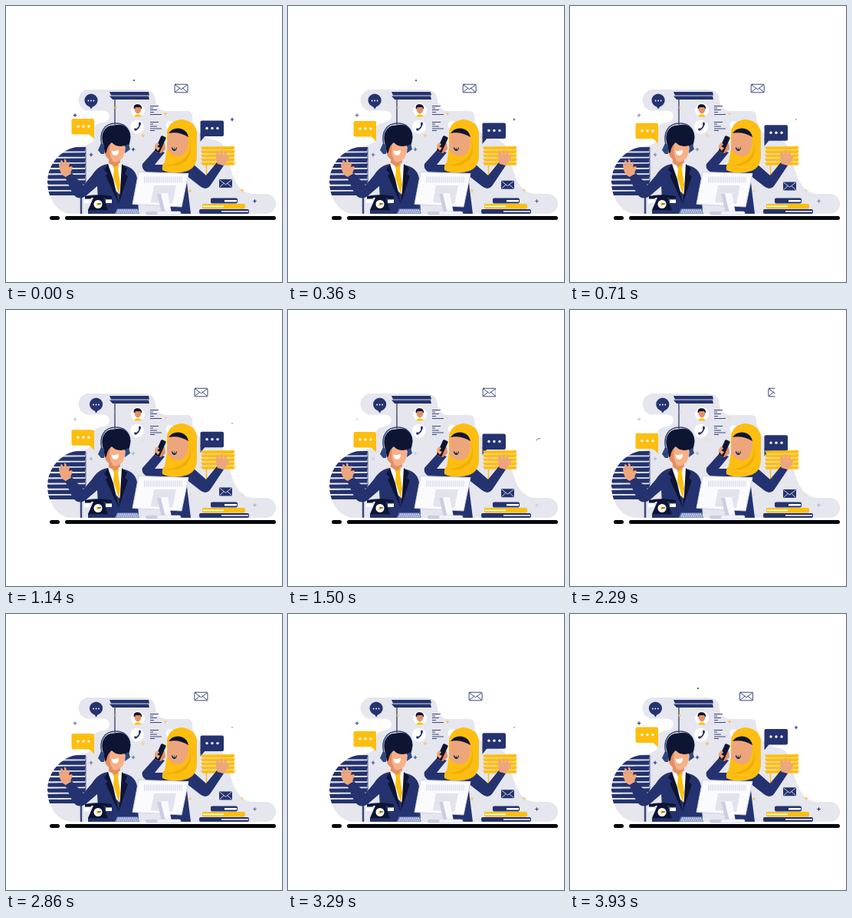
An HTML page that plays this animation: 360 by 360 pixels, repeating every 4 s.

```html
<!DOCTYPE html>
<html lang="en">
<head>
<meta charset="utf-8">
<title>Support desk</title>
<style>
html, body { margin: 0; width: 100%; height: 100%; overflow: hidden; background: #fff }
svg { display: block; width: 100vw; height: 100vh }
.blue { fill: #24336f } .navy { fill: #0e1533 } .gold { fill: #fdbe10 } .fold { fill: #f0ad0c }
.pale { fill: #fff } .skin { fill: #f8b087 } .tan { fill: #eda67c } .shade { fill: #e58e62 }
.line { fill: none; stroke-linecap: round; stroke-linejoin: round }
</style>
</head>
<body>
<svg viewBox="0 0 360 360">
  <defs>
    <path id="blob" d="M106 109H179Q194 109 195 123Q196 137 211 137H236Q243 137 243 144Q243 151 245 153C250 169 262 173 274 175C287 180 288 193 291 205C297 228 304 244 323 245H339A13 13 0 0 1 339 271H84C65 269 54 249 54 229C55 205 72 188 91 184C102 182 111 181 115 174V158C118 152 125 153 130 151Q135 148 135 143Q134 137 126 136.500H106A14 14 0 0 1 106 109Z"/>
    <clipPath id="inBlob"><use href="#blob"/></clipPath>
    <clipPath id="mailEdge"><rect id="mailClip" width="271" height="360"/></clipPath>
  </defs>

  <use href="#blob" fill="#e5e6ee"/>
  <g id="leftBlind" class="blue" clip-path="url(#inBlob)"></g>
  <path class="line" d="M104 185V248" stroke="#24336f" stroke-width=".8"/>
  <path class="line" d="M98 246V270" stroke="#3c487b" stroke-width="2.500"/>
  <path class="blue" d="M135 112H186L187 116.500H137ZM135 117.500H186L187 122H139Z"/>
  <path d="M142 122V155" stroke="#46527f" stroke-width="1.500"/>

  <!-- contact list -->
  <g class="pale"><circle cx="172" cy="136" r="9"/><circle cx="171" cy="157.500" r="9"/><circle cx="214" cy="155.500" r="5.500"/></g>
  <path class="gold" d="M167 143.500Q172 139 177 143.500Q172 146 167 143.500Z"/>
  <path class="shade" d="M168 132H176V137Q172 144 168 137Z"/>
  <path class="navy" d="M167 135Q165 129 171 128Q178 128 177 135L175 132H169Z"/>
  <path class="line" d="M174.500 153.500Q174.500 159 169 161.500" stroke="#24336f" stroke-width="1.700"/>
  <path class="line" d="M174.500 153V154.500M169.500 161H168.500" stroke="#24336f" stroke-width="2.800"/>
  <path d="M188 130.500H199M188 133H192M188 135.500H197M188 138.500H193M188 141.500H203M188 151.500H199M188 154H192M188 157H197M188 160H203M188 162.500H194" stroke="#3c477a"/>

  <g id="stars"></g>
  <path id="spark" d="M-2.300 0H2.300M0 -2.300V2.300" stroke="#24336f" stroke-width="1.200"/>
  <circle id="dot" class="blue" cx="167" cy="97" r="1"/>

  <!-- speech bubbles -->
  <g id="round">
    <circle class="blue" cx="111" cy="123" r="8.600"/><path class="blue" d="M108 130L111 134.500L114 130Z"/>
    <g class="pale"><circle cx="107.500" cy="123.500" r=".9"/><circle cx="111" cy="123.500" r=".9"/><circle cx="114.500" cy="123.500" r=".9"/></g>
  </g>
  <g id="talk">
    <g>
      <rect class="gold" x="85.500" y="147" width="29.500" height="20.500" rx="2"/><path class="gold" d="M107 166L115 173.500V164Z"/>
      <g class="pale"><circle cx="94" cy="157" r="1.700"/><circle cx="101" cy="157" r="1.700"/><circle cx="108" cy="157" r="1.700"/></g>
    </g>
    <g>
      <rect class="blue" x="253.500" y="149.500" width="30.500" height="20.500" rx="2"/><path class="blue" d="M253.500 167V177L260 169Z"/>
      <g class="pale"><circle cx="262" cy="159.500" r="1.700"/><circle cx="269" cy="159.500" r="1.700"/><circle cx="276" cy="159.500" r="1.700"/></g>
    </g>
  </g>
  <g id="rightBlind" class="gold"></g>
  <path d="M261.500 207V223" stroke="#fdbe10" stroke-width="1.500"/>

  <!-- envelopes -->
  <g clip-path="url(#mailEdge)">
    <g id="mail" class="line" stroke="#24336f" stroke-width=".9">
      <rect x="-8.500" y="-5.300" width="17" height="10.600" rx="1.200" fill="#fff"/>
      <path d="M-8 -4.700L0 1.200L8 -4.700M-8 4.700L-2 -.2M8 4.700L2 -.2"/>
    </g>
  </g>
  <g id="mailLow">
    <rect class="blue" x="-8.500" y="-5.500" width="17" height="11" rx=".8"/>
    <path class="line" d="M-7.500 -4.500L0 1.500L7.500 -4.500M-7.500 4.500L-2.500 0M7.500 4.500L2.500 0" stroke="#e6e7ef" stroke-width=".9"/>
  </g>
  <path id="glint" class="line" d="M324 170Q325 167 329 167.500" stroke="#777"/>

  <!-- man -->
  <path class="blue" d="M134 206C124 207 118 212 112 221L101 234L86 218L77 223L87 245Q95 255 105 247L119 235L121 271H173L171 225Q169 212 155 208Z"/>
  <path class="tan" d="M78 223C72 221 69 214 69 205Q71 203 73 209L71 202Q73 199 76 207L76 200Q79 198 79 207L82 203Q84 203 82 210L86 209Q88 211 85 215L84 219Z"/>
  <path class="pale" d="M134 204L143 210L151 204L155 222L149 246L144 242L132 212Z"/>
  <path class="navy" d="M133 206L128 214L133 218L130 221L147 258L140 226L134 209ZM151 206L158 212L155 219L159 222L147 258L149 240Z"/>
  <path class="gold" d="M139 208L143 206L147 208L146 213L149 233L147 246L140 223L141 213Z"/>
  <path class="shade" d="M134 194H149V204L142 210L134 205Z"/>
  <path class="skin" d="M129 176Q142 167 155 177V190Q153 202 143 203.500Q134 203 129 192Z"/>
  <path class="shade" d="M129 176Q135 170 136 182Q133 193 140 203Q130 200 128 190Z"/>
  <path class="line" d="M125 181C121 164 129 153 143 153Q160 153 162 171L160 181" stroke="#31467f" stroke-width="1.500"/>
  <path class="navy" d="M129 192L127 181C122 167 129 155 141 155.500C154 152 163 161 162 171Q162 179 157 188L155 182Q144 185 138 178Q132 182 131 191Z"/>
  <path d="M120 188L124 179L128 181V193H124Z" fill="#31467f"/>
  <path d="M155 192L156 182L160 180L162 187Z" fill="#31467f"/>
  <path class="pale" d="M137.500 188.500Q142 190.500 147 187.500Q147 195 142.500 195Q138 195 137.500 188.500Z"/>

  <!-- woman -->
  <path class="blue" d="M195 187L178 206Q176 213 184 217L204 219L204 271H241L237 239L235 221L253 235Q262 242 268 232L284 208L275 204L261 221L245 207Q225 203 207 207L194 207L207 191Z"/>
  <path class="tan" d="M276 206C273 199 274 193 275 189Q277 188 279 195L280 188Q283 187 283 195L286 189Q289 189 287 197L290 194Q293 195 289 202L284 208Z"/>
  <path class="shade" d="M195 190Q192 182 199 178L207 179L208 187L202 192Z"/>
  <path class="gold" d="M210 164Q213 149 229 148Q245 149 249 164Q249 180 249 195Q249 210 237 215Q218 221 204 214Q203 207 207 204L210 186Z"/>
  <path class="fold" d="M239 172Q243 192 230 201Q217 209 206 207Q224 212 236 201Q244 191 239 172Z"/>
  <path class="tan" d="M212 167Q225 161 237.500 169Q240 190 228 195.500Q217 198 210 187Z"/>
  <path class="navy" d="M212 166Q218 158 228 160Q236 162 238 171Q225 163 212 166Z"/>
  <path class="navy" d="M216 184Q220 187 223 184Q223 189 219 189Q216 188 216 184Z"/>
  <path class="pale" d="M217 185Q220 187 222 185V186.500H218Z"/>
  <rect class="navy" x="198" y="169" width="7" height="22" rx="1.500" transform="rotate(24 201 180)"/>
  <path class="tan" d="M194 184Q194 179 198 178L200 181L197 183L201 185L198 189Z"/>

  <!-- desk -->
  <path class="navy" d="M103 248Q120 244.500 138 248V251.500H131L129 250H112L110 251.500H103ZM114 250H127L133 266V271H107V266Z"/>
  <path class="blue" d="M107 266.500H134V271H107Z"/>
  <path class="pale" d="M102 252.500H110V257H102ZM130 252.500H138V257H130Z"/>
  <circle class="pale" cx="120" cy="258.500" r="5.500"/><circle class="gold" cx="120" cy="258.500" r="2"/>
  <path d="M120 258H124" stroke="#0e1533"/>
  <path fill="#7d90c6" d="M145 264.500H172L174 271H142Z"/>
  <path d="M146 266.500H171M145 269H172" stroke="#e6e9f6" stroke-width="1.300" stroke-dasharray="1.600 1"/>
  <path d="M173 216.500L238 218.500L229 262L165 258.500Z" fill="#fbfbff" stroke="#cfd2e4" stroke-linejoin="round"/>
  <path d="M180 226.500H230" stroke="#dfe1ec" stroke-width="8" stroke-dasharray="1.700 1"/>
  <path d="M193 234H222L217 258L189 256Z" fill="#e2e4ed"/>
  <path d="M197 245L211 244L216 270L203 270Z" fill="#f8f8fd"/>
  <path d="M197 245L202 245L208 270H203Z" fill="#cacde0"/>
  <rect x="182" y="268" width="18" height="4.500" rx="2" fill="#cacde0"/>
  <rect x="197" y="268" width="31" height="4.500" rx="2" fill="#f2f3fa" stroke="#d6d8e7" stroke-width=".6"/>

  <rect class="blue" x="267" y="250.500" width="35" height="7" rx="2"/><path class="pale" d="M285 253H301V255.500H285Z"/>
  <rect class="gold" x="256" y="258" width="56" height="6.500" rx="2"/><path class="pale" d="M257 260.500H284V262.200H257Z"/>
  <rect class="blue" x="252" y="265" width="65" height="6" rx="2"/><path class="pale" d="M281 267.300H316V268.700H281Z"/>
  <path class="line" d="M59.500 276.500H67.500M79.500 276.500H349.500" stroke="#04050d" stroke-width="5"/>
</svg>
<script>
const LOOP = 4000;
const $ = id => document.getElementById(id);
const move = (id, x, y) => $(id).setAttribute('transform', `translate(${x} ${y})`);
const show = (id, amount) => $(id).setAttribute('opacity', Number(amount));

const slats = (id, count, left, right, top, pitch, height) => {
  $(id).innerHTML = Array.from({ length: count }, (_, i) => {
    const y = top + i * pitch;
    return `<path d="M${left} ${y}L${right} ${y - .5}L${right - 1} ${y + height}H${left + 2}Z"/>`;
  }).join('');
};
slats('leftBlind', 9, 53, 104, 184.5, 7.2, 5);
slats('rightBlind', 5, 254, 298.5, 183.5, 5.1, 3.9);

const star = (x, y, color, r = 2.3) =>
  `<path d="M${x - r} ${y}H${x + r}M${x} ${y - r}V${y + r}" stroke="${color}" stroke-width="1.2"/>`;
const gold = [[143, 132.5], [208, 140.5], [179, 169], [240, 241], [308, 240.5]];
const dark = [[90, 142.5], [111, 194], [166, 187], [324.5, 254.5]];
$('stars').innerHTML =
  gold.map(([x, y]) => star(x, y, '#f6c24b')).join('') +
  dark.map(([x, y]) => star(x, y, '#24336f')).join('');

function draw(now) {
  const t = now % LOOP;
  const outward = t < LOOP / 2;
  const u = 1 - Math.abs(1 - t / (LOOP / 2));
  move('mail', 228.5 + 45.5 * u, 107.5);
  $('mailClip').setAttribute('width', outward ? 271 : 267.5);
  move('mailLow', 286.5, 231.5 + 9.5 * u);
  move('round', 11.5 * u, 0);
  move('talk', 0, 16 * u);
  show('stars', outward ? (1 - u) ** 1.4 : 1 - u * u);
  $('spark').setAttribute('transform', `translate(295 148) scale(${Math.max(.35, 1 - 2 * u)})`);
  show('spark', u < .7);
  show('dot', u < .3);
  show('glint', t > 1210 && t < 1790);
  requestAnimationFrame(() => draw(performance.now()));
}
draw(performance.now());
</script>
</body>
</html>
```
